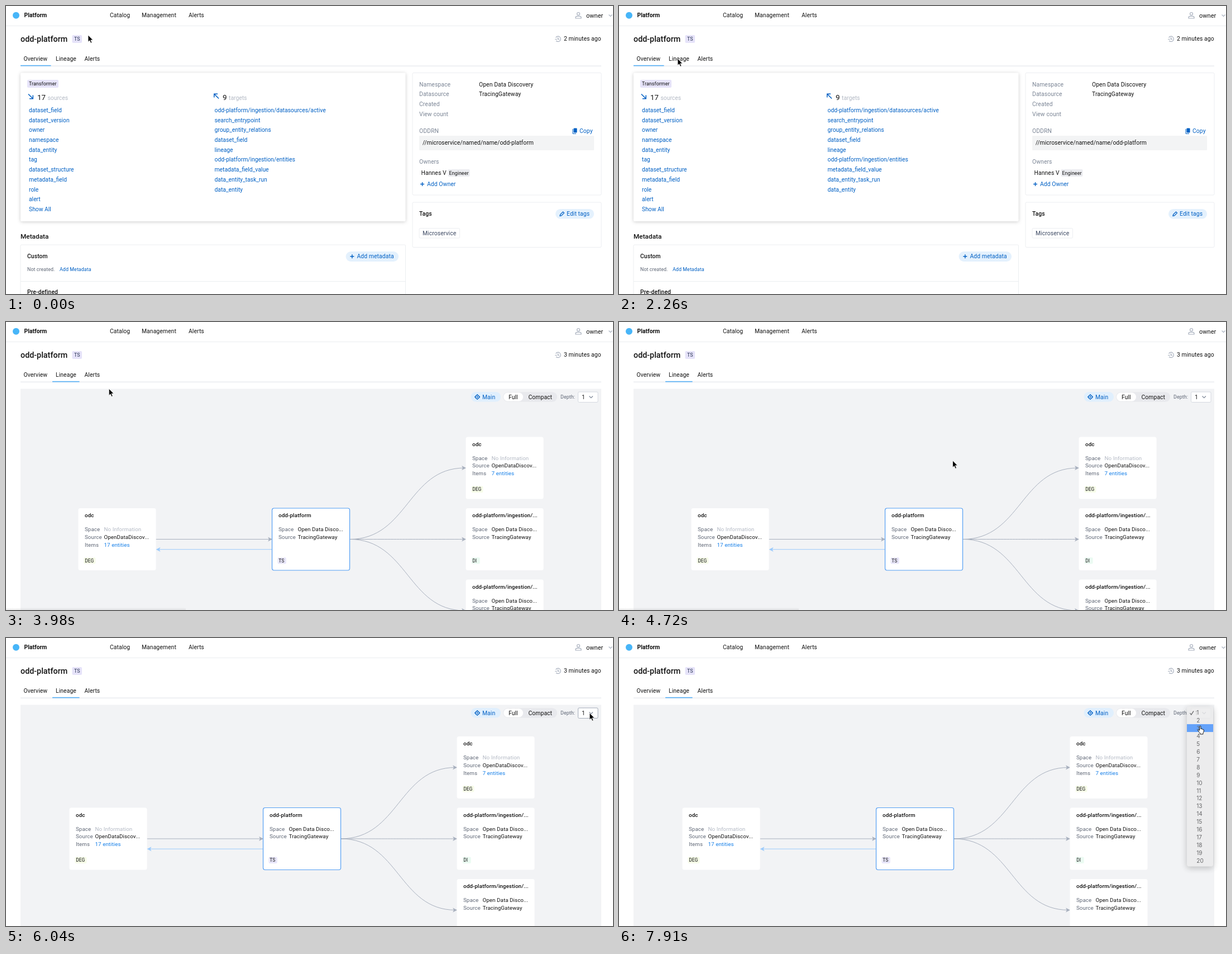
Animation, 1087 px wide and 515 px high, one loop 8 s. Source, as an HTML page:

```html
<!DOCTYPE html>
<html lang="en">
<head>
<meta charset="utf-8">
<title>Data lineage</title>
<style>
html, body { margin: 0; width: 100%; height: 100%; overflow: hidden; background: #fff; }
svg { display: block; width: 1087px; height: 515px; font-family: Roboto, Arial, sans-serif; }
text { white-space: pre; }
.card { filter: drop-shadow(0 1px 3px #0003); }
#menu .box { filter: drop-shadow(0 3px 6px #0004); }
#menu { font-family: Inter, Roboto, sans-serif; }
</style>
</head>
<body>
<svg id="stage" viewBox="0 0 1087 515"></svg>
<script>
const BLACK = '#111', GREY = '#7a8494', DIM = '#5e6675', PALE = '#b3b9c4', LINK = '#0060c4', EDGE = '#a8b0be';
const BODY = 10.33, SMALL = 8.85, NODE = 9.72, ROW = 13.94;

// y is the middle of the capitals
const text = (x, y, s, size = BODY, fill = BLACK, weight = 400, gap = .01) =>
  `<text x="${x}" y="${y + size * .355}" font-size="${size}" fill="${fill}" font-weight="${weight}" letter-spacing="${gap * size}">${s}</text>`;
const rect = (x, y, w, h, r, fill, more = '') =>
  `<rect x="${x}" y="${y}" width="${w}" height="${h}" rx="${r}" fill="${fill}" ${more}/>`;
const line = (d, stroke, width = 1, more = '') =>
  `<path d="${d}" fill="none" stroke="${stroke}" stroke-width="${width}" ${more}/>`;
const plus = (x, y) => line(`M${x - 3.5} ${y}h7M${x} ${y - 3.5}v7`, LINK, 1.4);
const border = color => `stroke="${color}"`;
const links = (x, names) => names.split(' ').map((s, i) =>
  text(x, 186.3 + i * 17.7, s.replace('~', ' '), BODY, LINK, 400, 0)).join('');

function header() {
  const tabs = [[31.5, 'Overview'], [89, 'Lineage'], [140.5, 'Alerts']];
  return line('M0 35.5H1087', '#ebecf0')
    + '<circle cx="18" cy="16.7" r="6" fill="#47b5f8"/>'
    + text(32.5, 16.8, 'Platform', BODY, BLACK, 700, 0)
    + text(186, 16.8, 'Catalog') + text(243, 16.8, 'Management') + text(327, 16.8, 'Alerts')
    + '<circle cx="1025" cy="14" r="2.5" fill="none" stroke="#a8b0be" stroke-width="1.2"/>'
    + line('M1020 22v-1.5q0-2.2 2.5-2.2h5q2.5 0 2.5 2.2V22Z', EDGE, 1.2)
    + text(1039, 16.8, 'owner', 10.9) + line('M1079.5 15.5l3 3 3-3', EDGE, 1.1)
    + text(26, 58.7, 'odd-platform', 14.35, BLACK, 500, 0)
    + rect(118.5, 52, 17.5, 14, 2, '#e6e3f9') + text(122, 59, 'TS', SMALL, '#253050')
    + line('M984.5 56.5A4.7 4.7 0 1 1 985 62M983 59.5h4M988.5 56v3.3h2.5', EDGE, 1.2)
    + `<text id="age" x="999" y="${58.8 + BODY * .355}" font-size="${BODY}" fill="${BLACK}" letter-spacing=".1"></text>`
    + line('M26 107.2H1066', '#dfe2e8')
    + tabs.map(([x, s]) => text(x, 94.2, s)).join('')
    + rect(83, 106, 49, 1.3, 0, '#8dc6fa', 'id="hover"')
    + rect(26, 105.8, 54.5, 1.6, 0, '#55b0f6', 'id="active"');
}

function overview() {
  const field = (y, name, value = '') => text(740, y, name, BODY, GREY) + text(847, y, value);
  const panel = (x, y, w, h) => rect(x, y, w, h, 2, '#fff', border('#eceef1'));
  return rect(26, 119.5, 689.5, 265.5, 2, '#fff', 'class="card"')
    + rect(38, 132, 56, 14, 2, '#e6e3f9') + text(41, 139, 'Transformer', SMALL)
    + line('M40 157.5l7.5 7.5M48.3 159.5v6.3h-6.3', LINK, 1.5)
    + text(56, 163, '17', 13.3) + text(74.5, 164, 'sources', BODY, PALE, 400, 0)
    + line('M381 165.5l-7.5-7.5M372.7 163.5v-6.3h6.3', LINK, 1.5)
    + text(388, 163, '9', 13.3) + text(399, 164, 'targets', BODY, PALE, 400, 0)
    + links(41, 'dataset_field dataset_version owner namespace data_entity tag dataset_structure metadata_field role alert Show~All')
    + links(373.5, 'odd-platform/ingestion/datasources/active search_entrypoint group_entity_relations dataset_field lineage odd-platform/ingestion/entities metadata_field_value data_entity_task_run data_entity')
    + text(26, 411.5, 'Metadata', 11.8, BLACK, 500, 0)
    + panel(26, 427, 689.5, 100) + line('M26 492.5H715', '#eceef1')
    + text(38, 447.7, 'Custom', BODY, BLACK, 500)
    + rect(608.5, 439, 94.5, 18, 9, '#e4f1fd') + plus(619.8, 447.8)
    + text(628.5, 447.8, 'Add metadata', BODY, LINK)
    + text(38, 471, 'Not created.', SMALL, DIM) + text(96, 471, 'Add Metadata', SMALL, LINK)
    + text(38, 511.5, 'Pre-defined', BODY, BLACK, 500)
    + panel(728, 119.5, 338, 218.5)
    + field(140, 'Namespace', 'Open Data Discovery') + field(157.8, 'Datasource', 'TracingGateway')
    + field(175.5, 'Created') + field(193.3, 'View count') + field(223, 'ODDRN')
    + rect(1016.5, 218.5, 6, 8, 1, LINK) + line('M1015 220v8.3h6', LINK) + text(1027, 223.3, 'Copy', BODY, LINK)
    + rect(740, 232, 313, 26, 1, '#f3f4f5') + text(746, 244.8, '//microservice/named/name/odd-platform', BODY, BLACK, 400, .006)
    + text(740, 278.8, 'Owners', BODY, GREY)
    + text(743.5, 298.5, 'Hannes V') + rect(791.5, 292, 39, 13, 2, '#ebecf0') + text(793.5, 298.5, 'Engineer', SMALL)
    + plus(745.5, 318.5) + text(754, 318.5, 'Add Owner', BODY, LINK)
    + panel(728, 351, 338, 80.5) + text(740, 371.7, 'Tags', BODY, BLACK, 500)
    + rect(984, 363, 69, 17.5, 8.7, '#e4f1fd')
    + line('M992 375.5l.6-2.6 4.8-4.8 2 2-4.8 4.8Z', LINK, 1.3) + text(1004, 371.8, 'Edit tags', BODY, LINK)
    + rect(740, 397.5, 72.5, 17.5, 2, '#fff', border('#eceef1')) + text(746, 406.4, 'Microservice', BODY, '#3a4761');
}

function node(x, y, title, space, source, items, tag, tint, main) {
  const row = (dy, name, value, color) => !value ? '' :
    text(11.5, dy, name, NODE, DIM) + text(46, dy, value, NODE, color);
  return `<g transform="translate(${x} ${y})">`
    + rect(0, 0, 139, 111, 3.5, '#fff', main ? 'stroke="#559ff3" stroke-width="1.2"' : '')
    + text(11.5, 12.8, title, 9.8, BLACK, 500)
    + row(37.8, 'Space', space, items ? PALE : BLACK) + row(51.5, 'Source', source, BLACK)
    + row(65.2, 'Items', items, '#157fe8')
    + rect(10, 88, 4 + tag.length * 5.6, 11.5, 2, tint) + text(11.7, 93.8, tag, 8.3, BLACK) + '</g>';
}

function graph() {
  const odd = 'Open Data Disco...', gate = 'TracingGateway', none = 'No Information', disc = 'OpenDataDiscov...';
  const step = 'odd-platform/ingestion/...';
  const head = (x, y, dir, fill) => `<path d="M${x} ${y}l${-8 * dir} -4 ${2 * dir} 4 ${-2 * dir} 4Z" fill="${fill}"/>`;
  const edge = y => line(`M615.5 388.5C719.5 388.5 719.5 ${y} 821 ${y}`, EDGE) + head(824, y, 1, EDGE);
  return edge(261) + edge(388.5) + edge(516)
    + line('M268.5 388.5H474', EDGE) + head(477, 388.5, 1, EDGE)
    + line('M476.5 406.7H271', '#9ccbfb') + head(268.5, 406.7, -1, '#9ccbfb')
    + node(129.5, 333, 'odc', none, disc, '17 entities', 'DEG', '#f6fce8')
    + node(476.5, 333, 'odd-platform', odd, gate, '', 'TS', '#e8e6fa', true)
    + node(823.5, 205.5, 'odc', none, disc, '7 entities', 'DEG', '#f6fce8')
    + node(823.5, 333, step, odd, gate, '', 'DI', '#ebfbf2')
    + node(823.5, 460.5, step, odd, gate, '', 'DI', '#ebfbf2');
}

function toolbar() {
  return rect(832.5, 125, 53.5, 17.5, 8.7, '#e0effd')
    + `<circle cx="844" cy="134" r="3.2" fill="none" stroke="${LINK}" stroke-width="1.3"/><circle cx="844" cy="134" r="1.2" fill="${LINK}"/>`
    + line('M844 129v2M844 137v2M839 134h2M847 134h2', LINK, 1.3) + text(853, 134, 'Main', BODY, LINK)
    + rect(890, 125.3, 97, 17.4, 8.7, '#e8e9ed') + rect(891, 126.3, 35, 15.4, 7.7, '#fff')
    + text(900, 134, 'Full') + text(935.5, 134, 'Compact') + text(993, 134, 'Depth:', SMALL, DIM)
    + rect(1024.5, 125, 35.5, 18.5, 2, '#fff', 'id="select"') + text(1031, 134, '1')
    + line('M1044.5 132.5l3.2 3.2 3.2-3.2', GREY, 1.1);
}

function menu() {
  let s = rect(1017, 122.5, 47, 286, 4, '#ebebec', 'class="box"') + rect(1017, 0, 47, 14, 0, '#4a93fb', 'id="pick"');
  for (let i = 0; i < 20; i++) s += text(1034.3, 133.6 + i * ROW, i + 1, 10, '#4c4c4e', 400, 0);
  return s + line('M1022.5 134.3l2.3 2.8 4.2-6.5', '#4c4c4e', 1.3);
}

const loading = rect(498.5, 308, 94.5, 20.5, 10, '#e3effa')
  + '<circle cx="510.5" cy="318.3" r="6" fill="none" stroke="#cfe3f7" stroke-width="1.4"/>'
  + line('M510.5 312.3a6 6 0 1 0 6 6', '#fff', 1.6, 'id="spin"')
  + text(523.5, 318.3, 'Loading lineage', SMALL, DIM, 500);

const stage = document.getElementById('stage');
const group = (id, body) => `<g id="${id}">${body}</g>`;
stage.innerHTML = '<defs><linearGradient id="fade" x2="0" y2="1"><stop stop-color="#888" stop-opacity="0"/><stop offset="1" stop-color="#888" stop-opacity=".22"/></linearGradient></defs>'
  + header() + group('overview', overview())
  + group('lineage', rect(26, 119.5, 1040, 396, 0, '#f2f3f5') + group('loading', loading)
    + group('view', group('graph', graph()) + toolbar()))
  + group('menu', menu()) + rect(-5, 510.5, 327, 6, 3, 'url(#fade)', 'id="status"')
  + '<path id="arrow" d="M0 0V12.3l2.8-2.6 2 4.6 2.1-.9-2-4.5h3.9Z" fill="#000" stroke="#fff" stroke-width=".8"/>'
  + '<path id="hand" d="M3.2 8V1.5q0-1.3 1.1-1.3t1.1 1.3V5.5q1.8-.8 2 .5 1.6-.6 1.8.7 1.7-.3 1.7 1.2 0 3.5-1.5 5V15H4.3v-1.7Q2.2 11.5.6 8.6q-.6-1.3.5-1.6 1-.2 2.1 1.6" fill="#fff" stroke="#000" stroke-width=".9"/>';

const $ = id => document.getElementById(id);
const show = (id, on) => $(id).setAttribute('display', on ? 'inline' : 'none');
const move = (id, x, y) => $(id).setAttribute('transform', `translate(${x} ${y})`);

// Part of n held steps done: the first falls on a, the last on b; steps may come slightly early
const steps = (t, a, b, n) => t < a ? 0 : t >= b ? 1 : Math.floor((t - a) / (b - a) * (n - 1) + 1.2) / n;
const ease = p => (1 - Math.cos(Math.PI * p)) / 2;

// start, end, steps, x, y
const path = [
  [1430, 2000, 7, 104, 93], [2260, 2260, 1, 105, 94], [2710, 2800, 2, 110.5, 94.5],
  [3980, 4265, 4, 614, 263], [4360, 4360, 1, 600, 252], [4720, 5010, 4, 583, 223.5],
  [5420, 6040, 8, 1045, 134], [6120, 6120, 1, 1041, 134], [6480, 6660, 3, 1036.5, 157]
];

function pointer(t) {
  let x = 147, y = 52;
  for (const [a, b, n, tx, ty] of path) {
    const p = ease(steps(t, a, b, n));
    x += (tx - x) * p;
    y += (ty - y) * p;
  }
  return [x, y];
}

function draw(t) {
  const opened = t >= 3070, ready = t >= 3350, chosen = t >= 3250;
  $('age').textContent = (opened ? 3 : 2) + ' minutes ago';
  show('overview', !opened);
  show('lineage', opened);
  show('loading', !ready);
  show('view', ready);
  $('spin').setAttribute('transform', `rotate(${(t - 3160) * .36} 510.5 318.3)`);
  show('hover', t >= 2710 && !chosen);
  $('active').setAttribute('x', chosen ? 83 : 26);
  $('active').setAttribute('width', chosen ? 48.5 : 54.5);
  show('status', opened && t < 5010);

  const drag = Math.max(0, (steps(t, 4720, 5010, 4) * 4 - 1) / 3);
  move('graph', -16 * drag, -29.5 * (1 - (1 - drag) ** 1.3));

  $('select').setAttribute('stroke', t >= 6040 && t < 7740 ? '#a3abb9' : '#d5d9e0');
  show('menu', t >= 6120);
  $('menu').setAttribute('opacity', t >= 7910 ? .84 : 1);
  const row = t < 6480 ? 0 : t < 6660 ? 1 : 2;
  $('pick').setAttribute('y', 126.2 + row * ROW);
  show('pick', t < 7740 || t >= 7820);

  const onLink = t >= 2710 && t < 3980 || t >= 6120, [x, y] = pointer(t);
  show('hand', onLink);
  show('arrow', !onLink);
  move(onLink ? 'hand' : 'arrow', x, y);
}

const start = performance.now();
function tick() {
  draw((performance.now() - start) % 8000);
  requestAnimationFrame(tick);
}
tick();
</script>
</body>
</html>
```
